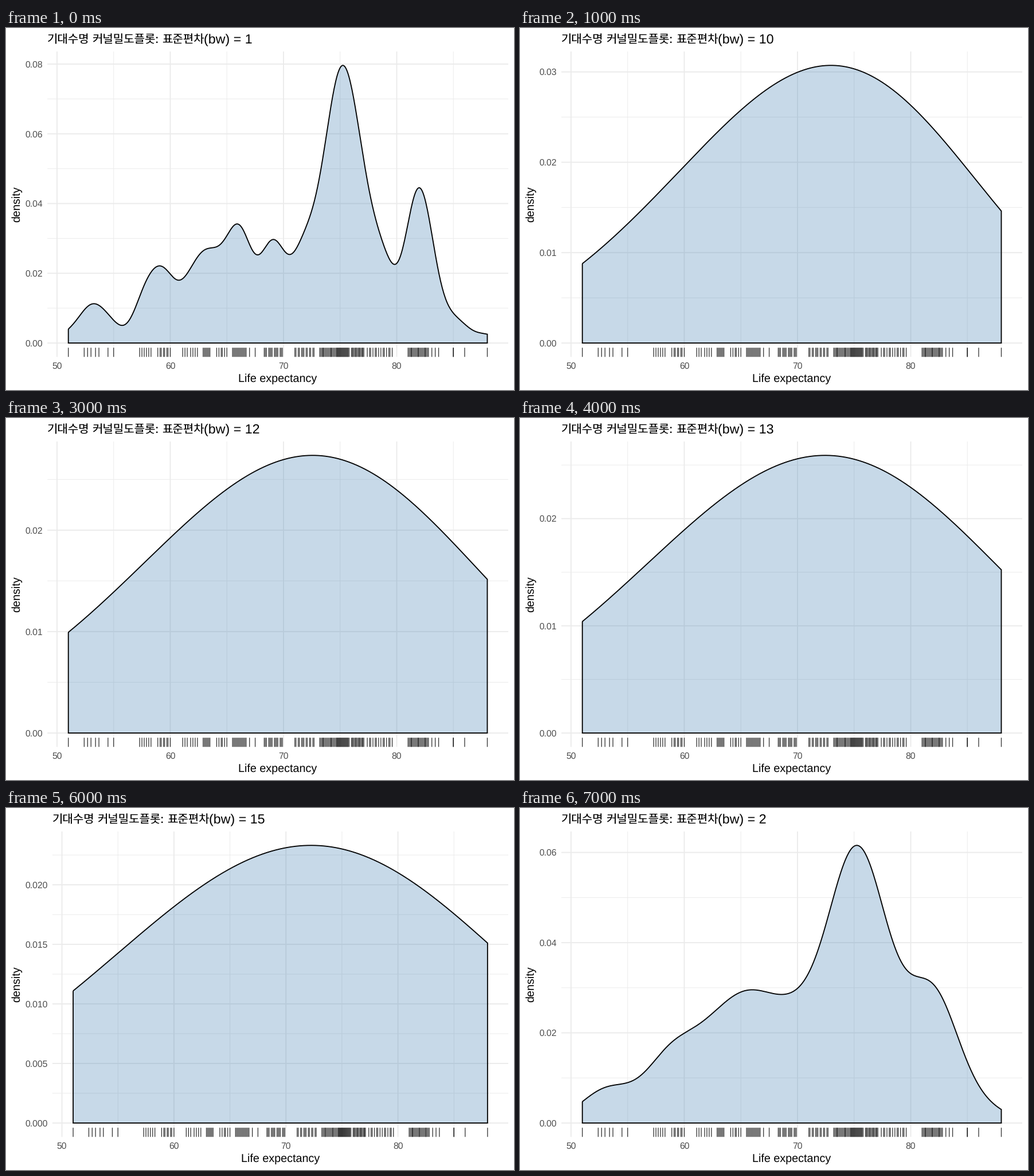
A matplotlib script for the animation above (8000 ms loop, 886 px wide and 632 px high).

```python
import numpy as np
import matplotlib.pyplot as plt
from matplotlib.animation import FuncAnimation

W, H, DPI = 886, 632, 64
PX = 72 / DPI  # points per pixel

plt.rcParams["text.hinting"] = "none"
SANS, HANGUL = "Liberation Sans", "Noto Sans CJK JP"

# Groups of evenly spread observations: first, last, count
GROUPS = [(51, 51, 1), (52.4, 53.7, 5), (54.5, 55, 2), (57.3, 58.3, 6),
          (58.9, 60, 8), (61.1, 62.4, 7), (62.9, 63.5, 7), (64.1, 65, 6),
          (65.5, 66.7, 13), (67, 67.5, 2), (68.3, 69.9, 14), (71, 72.7, 13),
          (73.2, 74.5, 16), (74.6, 75.8, 24), (76, 77.1, 16), (77.4, 79.6, 14),
          (81, 82.8, 22), (83.1, 83.7, 3), (85, 85, 2), (86, 88, 2)]
ages = np.concatenate([np.linspace(*g) for g in GROUPS]).round(1)
grid = np.linspace(ages.min(), ages.max(), 512)

# Panel geometry in pixels, with 5 % padding around the data
TOP, BOTTOM, RIGHT = 41.0, 574.2, 876.0
SPAN_Y = (BOTTOM - TOP) / 1.1
ZERO_Y = BOTTOM - SPAN_Y * 0.05
TICK, LABEL, TITLE, KOREAN = 15.75, 19.7, 23.3, 20.0
CAP = 0.716  # cap height relative to font size
GRID = "#EBEBEB"

BANDWIDTHS = [1, *range(10, 16), 2]

fig = plt.figure(figsize=(W / DPI, H / DPI), dpi=DPI, facecolor="white")
ax = fig.add_axes([0, 0, 1, 1])


def density(bw):
    z = (grid[:, None] - ages) / bw
    return np.exp(-z * z / 2).sum(axis=1) / (len(ages) * bw * np.sqrt(2 * np.pi))


def tick_step(peak):
    """Spacing and decimals of the density labels."""
    if peak > 0.04:
        return 0.02, 2
    return (0.01, 2) if peak > 0.025 else (0.005, 3)


def line(xs, ys, color, width, **kw):
    ax.plot(xs, ys, color=color, lw=width * PX, snap=False,
            solid_capstyle="butt", **kw)


def text(x, y, s, size, color="black", font=SANS, **kw):
    ax.text(x, y, s, fontsize=size * PX, color=color, family=font,
            va="baseline", rotation_mode="anchor", **kw)


def draw(i):
    ax.clear()
    ax.set(xlim=(0, W), ylim=(H, 0))
    ax.axis("off")

    bw = BANDWIDTHS[i]
    curve = density(bw)
    peak = curve.max()
    step, digits = tick_step(peak)
    left = 72.2 + (digits - 2) * 0.556 * TICK
    span_x = (RIGHT - left) / 1.1

    def px(v):
        return left + span_x * (0.05 + (v - grid[0]) / (grid[-1] - grid[0]))

    def py(d):
        return ZERO_Y - SPAN_Y * d / peak

    # Grid: thin lines halfway between the labelled ones
    for v in range(50, 90, 5):
        major = v % 10 == 0
        line([px(v)] * 2, [TOP, BOTTOM], GRID, 1.9 if major else 0.96, zorder=1)
        if major:
            text(px(v), 594.6, str(v), TICK, "#4D4D4D", ha="center")
    for k, d in enumerate(np.arange(0, peak * 1.05, step / 2)):
        major = k % 2 == 0
        line([left, RIGHT], [py(d)] * 2, GRID, 1.9 if major else 0.96, zorder=1)
        if major:
            text(left - 8.6, py(d) + CAP * TICK / 2, f"{d:.{digits}f}", TICK,
                 "#4D4D4D", ha="right")

    # Density area with a closed outline
    xs = np.r_[px(grid), px(grid[-1]), px(grid[0]), px(grid[0])]
    ys = np.r_[py(curve), ZERO_Y, ZERO_Y, py(curve[0])]
    ax.fill(xs, ys, color="steelblue", alpha=0.3, lw=0, snap=False, zorder=2)
    line(xs, ys, "black", 1.85, solid_joinstyle="miter", zorder=3)

    # Rug
    ax.vlines(px(ages), BOTTOM - 16, BOTTOM, color="black", alpha=0.8,
              lw=1.3 * PX, snap=False, capstyle="butt", zorder=3)

    # Titles
    for dx, word in ((0, "기대수명"), (78, "커널밀도플롯:"), (200, "표준편차")):
        text(left + dx, 26.8, word, KOREAN, font=HANGUL)
    text(left + 272.8, 27, f"(bw) = {bw}", TITLE)
    text((left + RIGHT) / 2, 618, "Life expectancy", LABEL, ha="center")
    text(24, (TOP + BOTTOM) / 2, "density", LABEL, ha="center", rotation=90)
    return []


anim = FuncAnimation(fig, draw, frames=len(BANDWIDTHS), interval=1000,
                     init_func=lambda: [], repeat=True, repeat_delay=0)
plt.show()
```
